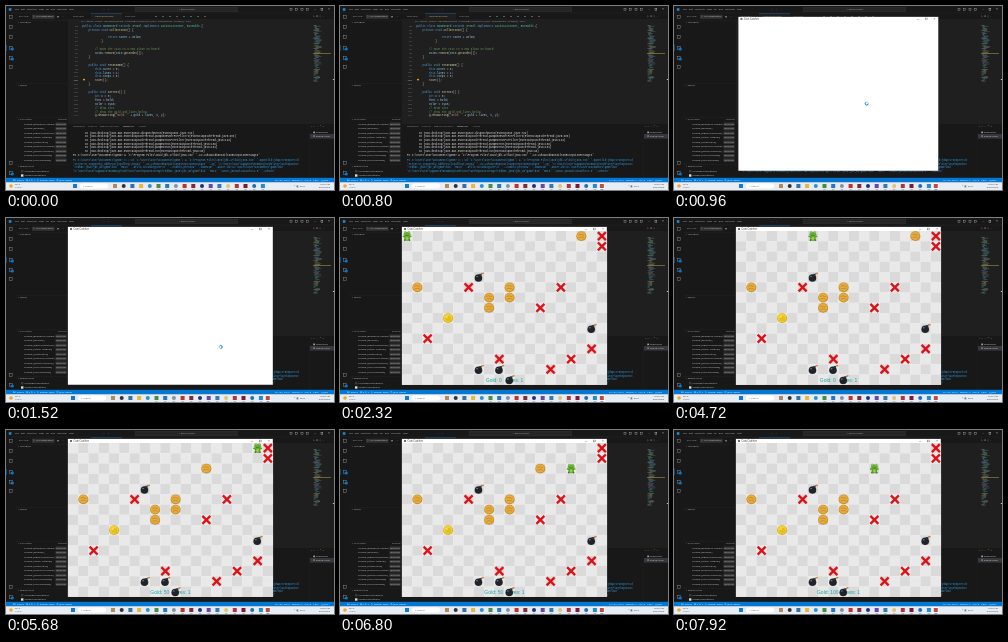
Write an HTML page with a canvas that moves like this. It is 328 px wide and 184 px high and loops after 8 s.

```html
<!DOCTYPE html>
<html lang="en">
<head>
<meta charset="utf-8">
<title>Coin board</title>
<style>
html, body { margin: 0; width: 100%; height: 100%; overflow: hidden; background: #1f1f1f; }
canvas { display: block; width: 328px; height: 184px; }
</style>
</head>
<body>
<canvas id="stage"></canvas>
<script>
const W = 328, H = 184, LOOP = 8000, CELL = 10.25, BX = 62, BY = 13;
const canvas = document.getElementById('stage');
const dpr = window.devicePixelRatio || 1;
canvas.width = W * dpr;
canvas.height = H * dpr;
const c = canvas.getContext('2d');
const SANS = '"Open Sans", "Liberation Sans", sans-serif';
const MONO = '"Liberation Mono", "DejaVu Sans Mono", monospace';
const PANEL = '#181818', EDGE = '#2b2b2b';

function rect(x, y, w, h, fill) {
  c.fillStyle = fill;
  c.fillRect(x, y, w, h);
}
function oval(x, y, rx, ry, fill) {
  c.fillStyle = fill;
  c.beginPath();
  c.ellipse(x, y, rx, ry, 0, 0, 7);
  c.fill();
}
function line(points, color, width) {
  c.strokeStyle = color;
  c.lineWidth = width;
  c.beginPath();
  points.forEach(([x, y], i) => i ? c.lineTo(x, y) : c.moveTo(x, y));
  c.stroke();
}
function box(x, y, w, h, color, width) {
  c.strokeStyle = color;
  c.lineWidth = width;
  c.strokeRect(x, y, w, h);
}
function text(s, x, y, fill, size = 3, font = SANS, align = 'left') {
  c.font = size + 'px ' + font;
  c.textAlign = align;
  c.textBaseline = 'middle';
  c.fillStyle = fill;
  c.fillText(s, x, y);
}
function clipTo(x, y, w, h, draw) {
  c.save();
  c.beginPath();
  c.rect(x, y, w, h);
  c.clip();
  draw();
  c.restore();
}
function random(seed) {
  return () => (seed = (seed * 16807) % 2147483647) / 2147483647;
}

const TOKEN = /(\/\/.*)|("[^"]*")|\b(public|private|class|extends|implements|void|int|new|if|this|true|false|return)\b|\b([A-Z]\w+)|(\w+)(?=\()|(\w+)|(\W)/g;
const COLORS = ['#6a9955', '#ce9178', '#569cd6', '#4ec9b0', '#dcdcaa', '#9cdcfe', '#d4d4d4'];
function codeLine(s, x, y) {
  c.font = '2.7px ' + MONO;
  for (const m of s.matchAll(TOKEN)) {
    const kind = m.slice(1).findIndex(v => v !== undefined);
    text(m[0], x, y, COLORS[kind], 2.7, MONO);
    x += c.measureText(m[0]).width;
  }
}

const CODE = [
  'public class GameBoard extends JPanel implements ActionListener, Runnable {',
  '    private void collectCoin() {',
  '',
  '                return score + value;',
  '            }',
  '',
  '        // move the coin to a new place on board',
  '        coins.remove(coin.getIndex());',
  '    }', '',
  '    public void resetGame() {',
  '        this.score = 0;',
  '        this.lives = 1;',
  '        this.steps = 0;',
  '        start();',
  '    }', '',
  '    public void setText() {',
  '        int x = 0;',
  '        font = bold;',
  '        color = cyan;',
  '        // draw text',
  '        // show the gold and lives below',
  '        g.drawString("Gold: " + gold + lives, x, y);'
];

function drawActivityBar() {
  rect(0, 7, 10, 165, PANEL);
  rect(10, 7, 0.3, 165, EDGE);
  for (const y of [11, 21, 31, 42, 52, 61, 157, 167]) box(3.6, y - 1.5, 2.6, 2.9, '#868686', 0.5);
  for (const y of [43, 53, 168]) oval(6.3, y, 1.6, 1.6, '#0078d4');
  rect(0, 39, 0.5, 6, '#0078d4');
}

function drawSidebar() {
  rect(10.3, 7, 51.7, 165, PANEL);
  text('RUN AND...', 13, 10.7, '#bbb', 2.1);
  rect(26, 8.7, 22.5, 4.2, '#313131');
  text('▷', 27, 10.8, '#7ac47a', 2.6);
  text('No Configurations', 30, 10.8, '#ccc', 2.1);
  oval(52, 10.8, 0.8, 0.8, '#aaa');
  text('···', 56, 10.5, '#ccc', 2.5);
  const heads = [['VARIABLES', 16.5], ['WATCH', 79.5], ['CALL STACK', 113.5], ['BREAKPOINTS', 160.7]];
  for (const [s, y] of heads) {
    rect(10, y - 2.4, 52, 0.3, EDGE);
    text('⌄ ' + s, 11.5, y, '#ccc', 2.2);
  }
  text('Running', 60.5, 113.5, '#aaa', 2.2, SANS, 'right');
  const threads = ['Reference Handler', 'Finalizer', 'Signal Dispatcher', 'Attach Listener', 'Notification',
    'Common-Cleaner', 'Java2D Disposer', 'AWT-Shutdown', 'AWT-Windows'];
  threads.forEach((s, i) => {
    const y = 118.2 + i * 4.5;
    clipTo(16, y - 2, 32.5, 4, () => text('Thread [' + s + ']', 18, y, '#ccc', 2.5));
    rect(49.5, y - 1.6, 11, 3.2, '#3a3a3a');
    text('RUNNING', 55, y, '#ccc', 2, SANS, 'center');
  });
  ['Uncaught Exceptions', 'Caught Exceptions'].forEach((s, i) => {
    const y = 165.2 + i * 4.3;
    rect(15, y - 1.2, 2.4, 2.4, i ? '#ddd' : '#3a3a3a');
    text(s, 18.5, y, '#ccc', 2.5);
  });
}

function drawEditor() {
  rect(62, 7, 266, 6, PANEL);
  rect(85, 7, 31, 6, '#1f1f1f');
  rect(85, 7, 31, 0.4, '#0078d4');
  text('Main.java', 67, 10.5, '#999', 2.4);
  text('GameBoard.java', 89, 10.5, '#d9ad65', 2.4);
  text('Coin.java', 119, 10.5, '#999', 2.4);
  for (let i = 0; i < 8; i++) {
    oval(150 + i * 7, 10.5, 0.6, 0.6, ['#75beff', '#75beff', '#89d185', '#f48771'][i % 4]);
  }
  text('▷  ⚙  ▯  ···', 307, 10.5, '#aaa', 2.4);
  text('src › game › board › GameBoard.java › Language Support for Java › GameBoard › setText() : void', 75, 15.8, '#a0a0a0', 2.5);
  CODE.forEach((s, i) => {
    const y = 20 + i * 3.9;
    text(String(i + 88), 72, y, i === 14 ? '#ccc' : '#6e7681', 2.5, MONO, 'right');
    codeLine(s, 76, y);
  });
  oval(78, 73.6, 0.9, 0.9, '#ffcc00');
  const rnd = random(71);
  c.globalAlpha = 0.55;
  for (let y = 19; y < 75; y += 0.9) {
    const x = 307.5 + Math.floor(rnd() * 3);
    rect(x, y, 1 + rnd() * 6, 0.5, COLORS[Math.floor(rnd() * 7)]);
  }
  c.globalAlpha = 1;
  rect(307, 47, 18, 0.6, '#a58f35');
  rect(326.8, 73, 1.2, 1, '#c0c0c0');
}

function drawTerminal() {
  rect(62, 117.5, 266, 54.5, PANEL);
  rect(62, 117.5, 266, 0.3, EDGE);
  text('PROBLEMS     OUTPUT     DEBUG CONSOLE', 67, 120.7, '#999', 2.3);
  text('TERMINAL', 117, 120.7, '#eee', 2.3);
  text('PORTS', 133, 120.7, '#999', 2.3);
  text('+ ⌄  ···  ^  ×', 305, 120.7, '#bbb', 2.5);
  const calls = ['EventQueue.dispatchEvent(EventQueue.java:722)', 'EventDispatchThread.pumpOneEventForFilters(EventDispatchThread.java:203)',
    'EventDispatchThread.pumpEventsForFilter(EventDispatchThread.java:124)', 'EventDispatchThread.pumpEvents(EventDispatchThread.java:109)',
    'EventDispatchThread.pumpEvents(EventDispatchThread.java:101)', 'EventDispatchThread.run(EventDispatchThread.java:90)'];
  calls.forEach((s, i) => text('at java.desktop/java.awt.' + s, 79, 127 + i * 3.65, '#e4e4e4', 2.6, MONO));
  const rows = ["PS C:\\Users\\user\\Documents\\game> c:; cd 'c:\\Users\\user\\Documents\\game'; & 'C:\\Program Files\\Java\\jdk-17\\bin\\java.exe' '-agentlib:jdwp=transport=dt_socket'",
    "'server=n,suspend=y,address=localhost:51034' '-XX:+ShowCodeDetailsInExceptionMessages' '-cp' 'C:\\Users\\user\\AppData\\Roaming\\Code\\User\\workspaceStorage'",
    "'redhat.java\\jdt_ws\\game\\bin' 'Main' '-Dfile.encoding=UTF-8' '--enable-preview' '-Xmx512m' '-Duser.dir=C:\\Users\\user\\Documents\\game\\bin'",
    "'C:\\Users\\user\\AppData\\Roaming\\Code\\User\\workspaceStorage\\redhat.java\\jdt_ws\\game\\bin' 'Main' '-Dsun.java2d.uiScale=1.0' '-Xshare'"];
  clipTo(62, 125, 231, 46, () => {
    text("PS C:\\Users\\user\\Documents\\game> & 'C:\\Program Files\\Java\\jdk-17\\bin\\java.exe' '-XX:+ShowCodeDetailsInExceptionMessages'", 67, 149, '#e4e4e4', 2.6, MONO);
    rows.forEach((s, i) => text(s, 67, 154.5 + i * 3.65, '#2f9ee6', 2.6, MONO));
  });
  rect(303, 124.5, 0.3, 47, EDGE);
  rect(304, 128, 24, 4.6, '#37373d');
  text('▣ powershell', 307, 126, '#ccc', 2.4);
  text('⚙ Debug: Main', 307, 130.4, '#ccc', 2.4);
}

function drawShell(opened) {
  rect(0, 0, W, H, '#1f1f1f');
  drawEditor();
  drawTerminal();
  drawActivityBar();
  drawSidebar();
  rect(0, 0, W, 7, PANEL);
  rect(0, 6.8, W, 0.3, EDGE);
  rect(2.8, 2.2, 2.6, 2.6, '#2489ca');
  text('File   Edit   Selection   View   Go   Run   Terminal   Help', 9, 3.5, '#bbb', 2.4);
  text('←  →', 97, 3.5, '#888', 2.6);
  rect(129, 1, 103, 5, '#343434');
  rect(129.3, 1.3, 102.4, 4.4, '#252525');
  text('⌕ game project', 181, 3.5, '#aaa', 2.4, SANS, 'center');
  for (let i = 0; i < 4; i++) box(284 + i * 5.5, 2.5, 2, 2, '#aaa', 0.4);
  text('—', 308, 3.5, '#ccc', 2.4);
  box(315, 2.6, 1.8, 1.8, '#ccc', 0.4);
  text('×', 322, 3.5, '#ccc', 3.4);
  rect(0, 171.8, W, 4.5, '#0078d4');
  text('⋈  main*   ⊗ 0 ⚠ 7   ▷ Debug: Main   ⟳ Java: Ready', 7, 174, '#fff', 2.5);
  text('Ln 102, Col 9   Spaces: 4   UTF-8   CRLF   {} Java', 322, 174, '#fff', 2.5, SANS, 'right');
  drawTaskbar(opened);
}

function drawTaskbar(opened) {
  rect(0, 176.2, W, 7.8, '#e7edf5');
  oval(5, 180, 1.8, 1.8, '#f2a92c');
  text('30°C', 9, 178.7, '#333', 2.4);
  text('Sunny', 9, 181.6, '#666', 2.3);
  const left = opened ? 66 : 68;
  rect(left - 1, 178, 4, 4, '#1479d4');
  c.fillStyle = '#fff';
  c.beginPath();
  c.roundRect(left + 6, 177.5, 28, 5, 2.5);
  c.fill();
  text('⌕ Search', left + 9, 180, '#555', 2.5);
  const tints = ['#b18a5d', '#333', '#3b6f9e', '#e8b73c', '#2795c9', '#4a8b45', '#2874c7', '#8791a0', '#bf3328',
    '#802c38', '#262f72', '#6848a0', '#3a78b5', '#e1c46d', '#ad363c', '#7b1b36', '#276bb4', '#218ed0'];
  tints.forEach((color, i) => {
    const x = left + 39 + i * 8.7;
    if (i % 3 === 1) oval(x + 2, 180, 2, 2, color);
    else rect(x, 178, 4, 4, color);
    if (i > 4) rect(x + 0.8, 183, 2.4, 0.5, '#7c8794');
  });
  if (opened) {
    rect(258.5, 177, 6.5, 6.5, '#f9fbfd');
    rect(259.8, 178, 4, 4, '#c9473c');
    rect(260.3, 183, 3, 0.6, '#1479d4');
  }
  text('^  ◧  ENG', 288, 180, '#333', 2.4);
  text('10:24 AM', 324, 178.6, '#333', 2.4, SANS, 'right');
  text('5/20/2023', 324, 181.6, '#333', 2.4, SANS, 'right');
}

const CROSSES = [[19, 0], [19, 1], [6, 5], [15, 5], [13, 7], [2, 10], [18, 11], [9, 12], [16, 12], [14, 13]];
const COINS = [[1, 5], [10, 5], [8, 6], [10, 6], [8, 7]];
const BOMBS = [[7, 4], [18, 9], [7, 13], [9, 13], [10, 14]];

function at([col, row], draw) {
  c.save();
  c.translate(BX + (col + 0.5) * CELL, BY + (row + 0.5) * CELL);
  draw();
  c.restore();
}
function cross() {
  line([[-4, -4], [4, 4]], '#dc1219', 2.3);
  line([[4, -4], [-4, 4]], '#dc1219', 2.3);
}
function coin(bright) {
  oval(0, 0, 5, 4.9, bright ? '#d9ad12' : '#c78a22');
  oval(-0.1, -0.2, 4.3, 4.1, bright ? '#f4d237' : '#e5ad40');
  if (bright) {
    oval(0.3, 0.3, 3, 2.8, '#e4bd20');
    oval(-1.2, -1.2, 1, 0.8, '#fae98a');
  } else {
    line([[-3, -1.2], [-0.5, -1.8], [2.8, -0.8]], '#bc8024', 0.7);
    line([[-2.6, 1.4], [0.4, 0.8], [2.6, 1.7]], '#bc8024', 0.7);
  }
}
function bomb() {
  line([[1.2, -2], [2.5, -3.5], [4, -3.6]], '#79533a', 0.8);
  oval(4.2, -3.8, 0.9, 0.9, '#e77b2c');
  oval(-0.4, 0.9, 3.8, 3.8, '#20242a');
  rect(0.3, -3.3, 2.4, 1.8, '#30353c');
  oval(-1.8, -0.6, 0.9, 0.7, '#737b84');
}
function frog() {
  const green = '#549f26';
  line([[-4.3, 0], [0, 1.8], [4.3, 0]], green, 1.5);
  line([[-2.8, 4.6], [-1.2, 2.5], [1.2, 2.5], [2.8, 4.6]], '#39761d', 1.7);
  oval(0, 1.8, 2.7, 2.9, green);
  oval(0, 2.2, 1.4, 1.8, '#a2c94b');
  oval(0, -1.7, 3.5, 2.5, '#64b030');
  for (const x of [-1.8, 1.8]) {
    oval(x, -3.7, 1.3, 1.2, '#64b030');
    oval(x, -3.8, 0.7, 0.7, '#f0f4d8');
    oval(x, -3.7, 0.35, 0.4, '#182510');
  }
  line([[-1.8, -0.9], [0, -0.4], [1.8, -0.9]], '#2c5918', 0.5);
}

// Key presses: time, column, row
const MOVES = [[2800, 1, 0], [3040, 2, 0], [3280, 3, 0], [3600, 4, 0], [3760, 5, 0], [4080, 6, 0]];
for (let i = 0; i < 12; i++) MOVES.push([4720 + i * 53, 7 + i, 0]);
MOVES.push([5920, 18, 1], [6160, 18, 2], [6400, 17, 2], [6720, 16, 2], [7040, 15, 2], [7280, 14, 2], [7600, 13, 2]);

function playerAt(t) {
  const past = MOVES.filter(m => m[0] <= t);
  return past.length ? past[past.length - 1].slice(1) : [0, 0];
}

function drawBoard(t) {
  for (let row = 0; row < 15; row++) {
    for (let col = 0; col < 20; col++) {
      rect(BX + col * CELL, BY + row * CELL, CELL + 0.1, CELL + 0.1, (row + col) % 2 ? '#dadada' : '#e9e9e9');
    }
  }
  const first = t >= 4720 + 53 * 10, second = t >= 7600;
  const gold = second ? 100 : first ? 50 : 0;
  COINS.forEach(p => at(p, () => coin(false)));
  at([4, 8], () => coin(true));
  if (!second) at(first ? [13, 2] : [17, 0], () => coin(false));
  CROSSES.forEach(p => at(p, cross));
  text('Gold: ' + gold + '   Lives: 1', 164.5, 162.2, '#18a5a0', 5, '"Liberation Sans", sans-serif', 'center');
  BOMBS.forEach(p => at(p, bomb));
  at(playerAt(t), frog);
}

function drawWindow(t) {
  if (t < 880) return;
  const grow = Math.min(1, (t - 880) / 200);
  const scale = 0.958 + 0.042 * grow;
  c.save();
  c.translate(164.2, 87.6);
  c.scale(scale, scale);
  c.translate(-164.2, -87.6);
  c.globalAlpha = Math.min(1, 0.6 + grow);
  rect(61.7, 8.7, 205.3, 158.2, '#777');
  rect(62, 9, 204.7, 157.6, '#fff');
  rect(64, 10, 2, 2, '#8b694c');
  text('Coin Catcher', 67.5, 11.1, '#333', 2.6);
  text('—', 246, 11, '#444', 2.6, SANS, 'center');
  box(253.7, 10.1, 1.8, 1.8, '#555', 0.4);
  text('×', 263, 11, '#444', 3.4, SANS, 'center');
  if (t >= 2000) drawBoard(t);
  c.restore();
}

function drawPointer(t) {
  if (t < 880 || t >= 1920) return;
  const p = Math.max(0, Math.min(1, (t - 960) / 560));
  const q = Math.max(0, Math.min(1, (t - 1640) / 200));
  const x = 192.7 + 22 * p + 30 * q, y = 97.5 + 31.5 * p + 50 * q;
  c.lineWidth = 0.9;
  c.strokeStyle = '#a5d4f5';
  c.beginPath();
  c.arc(x, y, 1.5, 0, 7);
  c.stroke();
  c.strokeStyle = '#087fd0';
  c.beginPath();
  c.arc(x, y, 1.5, t / 150, t / 150 + 4);
  c.stroke();
}

function frame(now) {
  const t = (now - start + LOOP) % LOOP;
  c.setTransform(dpr, 0, 0, dpr, 0, 0);
  drawShell(t >= 800);
  drawWindow(t);
  drawPointer(t);
  requestAnimationFrame(frame);
}
const start = performance.now();
frame(start);
</script>
</body>
</html>
```
